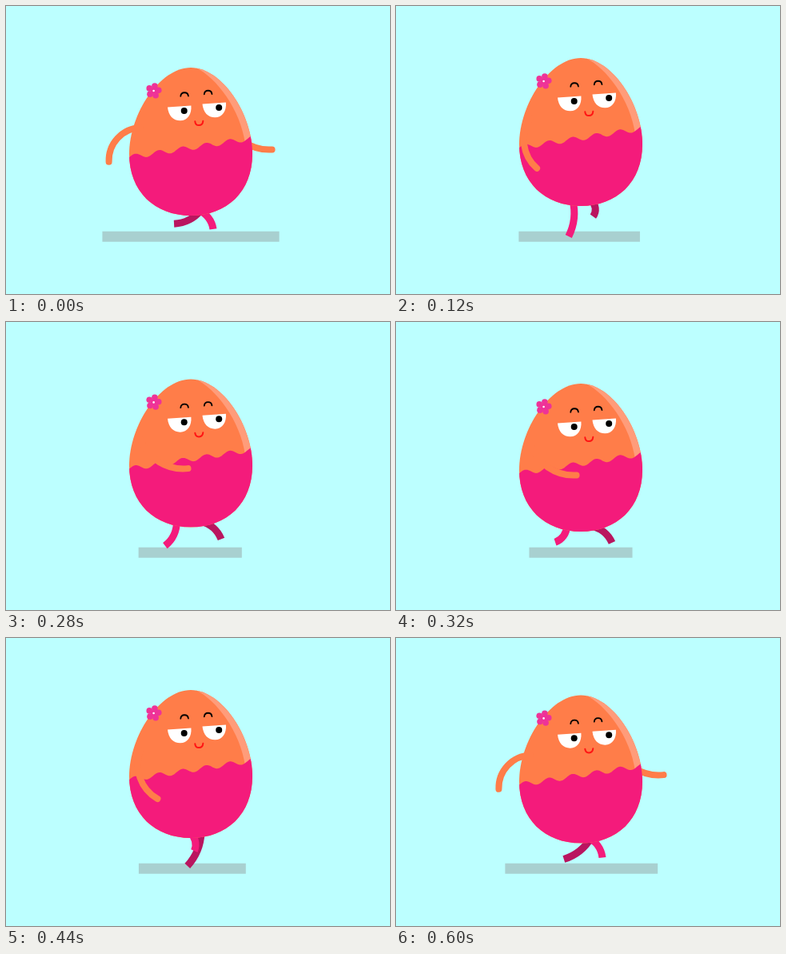
An HTML page for the animation above (640 ms loop, 480 px wide and 360 px high).

```html
<!DOCTYPE html>
<html lang="en">
<head>
<meta charset="utf-8">
<title>Walking egg</title>
<style>
  html, body { margin: 0; width: 100%; height: 100%; overflow: hidden; background: #bcffff; }
  svg { display: block; width: 100%; height: 100%; }
  .limb { fill: none; stroke-width: 9; }
  .arm { stroke: #ff7d49; stroke-width: 8; stroke-linecap: round; }
  .line { fill: none; stroke: #000; stroke-width: 1.8; stroke-linecap: round; }
  .mouth { stroke: #ff1414; stroke-width: 2; }
</style>
</head>
<body>
<svg viewBox="0 0 480 360">
  <defs>
    <path id="egg" d="M231 77C270 77 308 135 308 185C308 232 276 262 231 262C186 262 154 232 154 185C154 135 192 77 231 77Z"/>
    <clipPath id="inside"><use href="#egg"/></clipPath>
    <g id="eye">
      <path fill="#fff" d="M202 126.4L231.4 124.4C232.5 135 226.5 143.3 217.8 143.3C209 143.3 203 137 202 126.4Z"/>
      <circle cx="222.7" cy="130.9" r="4"/>
    </g>
    <path id="brow" class="line" d="M218.3 112.8C218.8 106.8 227.2 106.8 227.9 112.5"/>
  </defs>
  <rect id="shadow" y="281.7" height="13" fill="#a8d0d0"/>
  <g class="body"><path id="farArm" class="limb arm"/></g>
  <path id="farLeg" class="limb" stroke="#b9155f"/>
  <path id="nearLeg" class="limb" stroke="#f41b7b"/>
  <g class="body">
    <use href="#egg" fill="#ff7d49"/>
    <g clip-path="url(#inside)">
      <path fill="#ff9c7a" d="M235 76C261 87 293 128 299 172H320V70Z"/>
      <path id="pants" fill="#f41b7b"/>
    </g>
    <use href="#eye"/>
    <use href="#eye" x="43.5" y="-4"/>
    <use href="#brow"/>
    <use href="#brow" x="29.5" y="-2.5"/>
    <path class="line mouth" d="M236.3 144.3C237 150.8 245.6 150.8 246.3 143.8"/>
    <g id="flower" transform="translate(184.6 106)" fill="#ee3398"></g>
    <path id="nearArm" class="limb arm"/>
  </g>
</svg>
<script>
const STEP = 40, COUNT = 16;
const { sin, cos, abs, hypot, PI } = Math;
const $ = id => document.getElementById(id);
const bodies = document.querySelectorAll('.body');
const turn = s => s / COUNT * 2 * PI;

// Circular arc between two points, bulging by the given height
function arc(x1, y1, x2, y2, bulge, sweep) {
  const half = hypot(x2 - x1, y2 - y1) / 2;
  const r = (half ** 2 + bulge ** 2) / (2 * bulge);
  return `M${x1} ${y1}A${r} ${r} 0 0 ${sweep} ${x2} ${y2}`;
}

// Pendulum swing from the shoulder; the arm is longest in front
function arm(x, y, s) {
  const swing = cos(turn(s + 0.7));
  const angle = (10.5 - 51 * swing - 4 * cos(2 * turn(s))) * PI / 180;
  const length = 64 - 6 * swing;
  return arc(x, y, x + length * sin(angle), y + length * cos(angle), 12, 0);
}

// The foot runs round a closed loop: slow sweep back, quick lift forward
function leg(hip, follow, lift, s, dx, dy) {
  const a = turn(s);
  const stride = 27.4 * cos(a + 0.535) + 2 * cos(2 * a) + 6.4 * cos(3 * a);
  const footY = 277 + 11.2 * cos(a - 1.41) + dy;
  return arc(hip + follow * stride, 255 + lift, 227 + stride + dx, footY, 4, 1);
}

function buildPants() {
  let d = 'M150 270';
  for (let x = 150; x <= 312; x++) {
    const u = x - 250;
    d += `L${x} ${174.2 - 0.155 * u - 3.2 * cos(u / 29.5 * 2 * PI)}`;
  }
  $('pants').setAttribute('d', d + 'V270Z');
}

function buildFlower() {
  const dot = (x, y, r, fill = '') => `<circle cx="${x}" cy="${y}" r="${r}" ${fill}/>`;
  let petals = dot(0, 0, 4);
  for (let k = 0; k < 5; k++) {
    const a = (72 * k - 6) * PI / 180;
    petals += dot(6.2 * cos(a), 6.2 * sin(a), 3.8);
  }
  $('flower').innerHTML = petals + dot(0, 0, 1.3, 'fill="#fff"');
}

function draw(s) {
  const opposite = s + COUNT / 2;
  const lift = 0.8 * ((s % 8 - 4) ** 2 - 16);
  bodies.forEach(g => g.setAttribute('transform', `translate(0 ${lift})`));

  const half = 64.5 + 0.09 * abs(8 - s) ** 3;
  $('shadow').setAttribute('x', 231 - 2 * sin(turn(s)) - half);
  $('shadow').setAttribute('width', 2 * half);

  $('nearArm').setAttribute('d', arm(168, 152, s));
  $('farArm').setAttribute('d', arm(275, 140, opposite));
  $('nearLeg').setAttribute('d', leg(226, 0.45, lift, s, 0, 0));
  $('farLeg').setAttribute('d', leg(244, 0, lift, opposite, 11, -3));
}

buildPants();
buildFlower();
draw(0);
const start = performance.now();
function tick() {
  draw(Math.floor((performance.now() - start) / STEP) % COUNT);
  requestAnimationFrame(tick);
}
requestAnimationFrame(tick);
</script>
</body>
</html>
```
